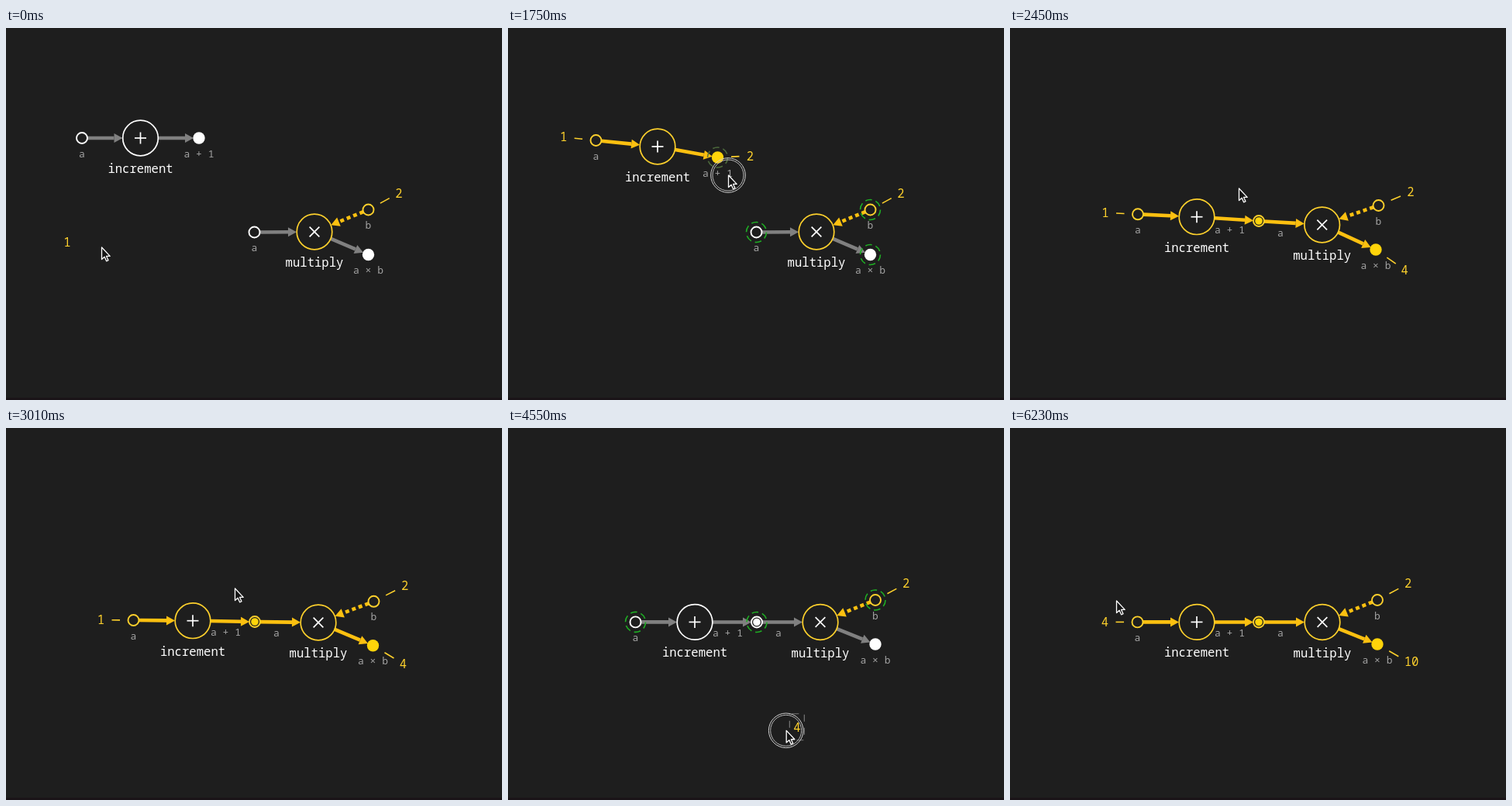
An HTML page for the animation above (6440 ms loop, 640 px wide and 480 px high).

```html
<!DOCTYPE html>
<html lang="en">
<head>
<meta charset="utf-8">
<title>Node graph</title>
<style>
  html, body { margin: 0; height: 100%; overflow: hidden; background: #1e1e1e; }
  svg { display: block; width: 640px; height: 480px; }
  text { font-family: "Noto Sans Mono", "DejaVu Sans Mono", monospace; white-space: pre; }
</style>
</head>
<body>
<svg id="stage" viewBox="0 0 640 480"></svg>
<script>
const LOOP = 6440, STEP = 70;
const BG = '#1e1e1e', GRAY = '#808080', WHITE = '#fff', LABEL = '#a3a3a3', GREEN = '#1fae24';
const GOLD = '#fdd02c', ARROW = '#fcc010', DISC = '#ffd40a';

// Moments at which the picture changes state
const GRAB_ONE = 280, DROP_ONE = 770, GRAB_PORT = 1470, DRAG_PORT = 1610, JOIN = 2030;
const HOVER_FOUR = 3640, GRAB_FOUR = 3850, DRAG_FOUR = 4060, CUT = 4410, DROP_FOUR = 5600;

const cursorTrack = [
  [70, 123, 283], [210, 79, 279], [350, 79, 279], [560, 70, 228], [700, 69, 180],
  [770, 74, 164], [910, 106, 138], [1050, 148, 121], [1120, 170, 113], [1260, 214, 126],
  [1470, 248, 156], [1540, 248, 156], [1750, 284, 190], [1960, 309, 232], [2030, 308, 235],
  [2240, 295, 207], [3010, 295, 207], [3360, 405, 252], [3640, 511, 301], [3990, 510.5, 306],
  [4130, 507, 345], [4270, 488, 397.5], [4340, 462, 395], [4800, 225, 384], [5040, 104, 366],
  [5180, 68.5, 316], [5320, 74, 282], [5460, 105, 247], [5600, 137, 223]
];

const times = [1540, 1750, 2030, 2240, 2450, 3010, 3990];
const track = (...points) => points.map(([x, y], i) => [times[times.length - points.length + i], x, y]);
const tracks = {
  inA: track([98, 142], [113.5, 145], [145, 190], [160, 228], [165, 240.3], [164.5, 248], [164.5, 250.4]),
  inc: track([173.5, 142], [193, 153], [230, 206], [238, 235], [241, 243.7], [241, 248.7], [241, 250.4]),
  out: track([249, 142], [270.5, 167], [314, 242], [321, 256], [321, 249], [321, 250], [321, 250.5]),
  mul: track([398, 263], [401, 258.5], [402.7, 254], [403, 251], [403, 250.5]),
  inB: track([467.5, 234.5], [473, 234], [475.5, 229], [474.5, 223.8], [474, 222]),
  prod: track([467.5, 292.5], [469, 291], [472, 286], [473.5, 280.7], [474, 279])
};

// Smooth curve through keys that never overshoots them
function sample(keys, t) {
  const last = keys.length - 1;
  if (t <= keys[0][0]) return keys[0].slice(1);
  if (t >= keys[last][0]) return keys[last].slice(1);
  const i = keys.findIndex(k => k[0] > t) - 1;
  const slope = (j, c) => (keys[j + 1][c] - keys[j][c]) / (keys[j + 1][0] - keys[j][0]);
  const tangent = (j, c) => {
    if (j === 0 || j === last) return 0;
    const p = slope(j - 1, c), q = slope(j, c);
    return p * q <= 0 ? 0 : 2 * p * q / (p + q);
  };
  const h = keys[i + 1][0] - keys[i][0], u = (t - keys[i][0]) / h;
  return [1, 2].map(c => {
    const a = keys[i][c], b = keys[i + 1][c];
    return a + (b - a) * u * u * (3 - 2 * u)
      + h * u * (1 - u) * ((1 - u) * tangent(i, c) - u * tangent(i + 1, c));
  });
}

const within = (t, from, to) => t >= from && t < to;
const add = (p, x, y) => [p[0] + x, p[1] + y];
const mix = (p, q, u) => [p[0] + (q[0] - p[0]) * u, p[1] + (q[1] - p[1]) * u];
const angle = (p, q) => Math.atan2(q[1] - p[1], q[0] - p[0]);
const polar = (p, a, r) => [p[0] + r * Math.cos(a), p[1] + r * Math.sin(a)];
const spring = s => s < 0 ? 0 : 1 - Math.exp(-s / 110) * Math.cos(s / 130);
const pop = s => 14 * Math.exp(-s / 35);
const f = n => n.toFixed(2);

const circle = (p, r, stroke, width, fill = 'none', extra = '') =>
  `<circle cx="${f(p[0])}" cy="${f(p[1])}" r="${r}" fill="${fill}" stroke="${stroke}" stroke-width="${width}" ${extra}/>`;
const line = (p, q, stroke, width, extra = '') =>
  `<line x1="${f(p[0])}" y1="${f(p[1])}" x2="${f(q[0])}" y2="${f(q[1])}" stroke="${stroke}" stroke-width="${width}" ${extra}/>`;
const text = (p, str, size, fill, anchor = 'middle') =>
  `<text x="${f(p[0])}" y="${f(p[1])}" font-size="${size}" fill="${fill}" text-anchor="${anchor}">${str}</text>`;

const caption = (p, str) => text(p, str, 13, LABEL);
const number = (p, str) => text(add(p, -4.7, 5.6), str, 15.6, GOLD, 'start');
const ring = (p, color = GREEN) => circle(p, 13, color, 1.6, 'none', 'stroke-dasharray="8.6 5.01"');
const openPort = (p, color) => circle(p, 7, color, 1.9, BG);
const fullPort = (p, on) => circle(p, 7.7, 'none', 0, on ? DISC : WHITE);

function arrow(from, to, r1, r2, on, dotted) {
  const a = angle(from, to), color = on ? ARROW : GRAY;
  const tip = polar(to, a, -r2), base = polar(tip, a, -11);
  const side = s => polar(base, a + s * Math.PI / 2, 6).map(f).join();
  return line(polar(from, a, r1), base, color, 4.6, dotted ? 'stroke-dasharray="5 4"' : '')
    + `<polygon points="${tip.map(f)} ${side(1)} ${side(-1)}" fill="${color}"/>`;
}

function node(p, name, on, turn) {
  const arms = [0, 1].map(k => {
    const a = turn + k * Math.PI / 2, r = turn ? 9 : 7.5;
    return line(polar(p, a, r), polar(p, a, -r), WHITE, 1.7);
  }).join('');
  return circle(p, 22.8, on ? GOLD : WHITE, 1.7, BG) + arms + text(add(p, 0, 45), name, 15.6, WHITE);
}

function tether(port, value) {
  const a = angle(port, value);
  const reach = Math.hypot(value[0] - port[0], value[1] - port[1]);
  const end = Math.min(reach - 14, 32);
  return end > 17.5 ? line(polar(port, a, 17.5), polar(port, a, end), GOLD, 1.6) : '';
}
const attached = (port, value, str) => tether(port, value) + number(value, str);

const grip = p =>
  `<rect x="${f(p[0] - 9.5)}" y="${f(p[1] - 18)}" width="19" height="34" fill="none" stroke="#777" stroke-width="1.2" stroke-dasharray="9 8" stroke-dashoffset="-3"/>`;

function pointer(p, pressed) {
  const halo = pressed ? circle(p, 22.3, '#d0d0d0', 1) + circle(p, 20, '#b5b5b5', 1) : '';
  return halo + `<path transform="translate(${f(p[0])} ${f(p[1])})" d="M0.5 0V15.6L4.1 12.3L6.6 17.8L9 16.7L6.6 11.4H11.2Z" fill="#151515" stroke="#fff" stroke-width="1.3" stroke-linejoin="round"/>`;
}

function draw(t) {
  const at = name => sample(tracks[name], t);
  const [inA, inc, out, mul, inB, prod] = ['inA', 'inc', 'out', 'mul', 'inB', 'prod'].map(at);
  const joined = t >= JOIN;
  const link = joined ? out : [320.5, 263.5];
  const incOn = within(t, DROP_ONE, CUT) || t >= DROP_FOUR;
  const mulOn = joined && incOn;
  const cursor = sample(cursorTrack, t);
  const held = (lag, x, y) => add(sample(cursorTrack, t - lag), x, y);
  const deg = Math.PI / 180;
  const color = on => on ? GOLD : WHITE;

  let s = `<rect width="640" height="480" fill="${BG}"/><rect y="477" width="640" height="3" fill="#1a1418"/>`;

  s += arrow(inA, inc, 7, 23, incOn) + arrow(inc, out, 23, 7, incOn);
  s += arrow(link, mul, 7, 23, mulOn) + arrow(mul, prod, 23, 7, mulOn) + arrow(inB, mul, 7, 23, true, true);
  s += node(inc, 'increment', incOn, 0) + node(mul, 'multiply', true, Math.PI / 4);

  s += openPort(inA, color(incOn)) + openPort(inB, GOLD) + fullPort(prod, mulOn);
  if (joined) s += openPort(link, color(incOn)) + circle(link, 4.8, 'none', 0, incOn ? DISC : WHITE);
  else s += openPort(link, WHITE) + fullPort(out, incOn);

  // Captions slide beside the shared port once the two nodes are joined
  const slide = Math.min(1, spring(t - JOIN));
  const outSpot = add(mix(out, inc, 37.5 / 80), 0, 18.7);
  const linkSpot = add(mix(link, mul, 28 / 82), 0, 18.7);
  s += caption(add(inA, 0, 24.5), 'a') + caption(add(inB, 0, 24.5), 'b') + caption(add(prod, 0, 24.5), 'a × b');
  s += caption(mix(add(out, 0, 24.5), outSpot, slide), 'a + 1');
  s += caption(mix(add(link, 0, 24.5), linkSpot, slide), 'a');

  if (within(t, GRAB_ONE, DROP_ONE)) s += [inA, out, link, inB, prod].map(p => ring(p)).join('');
  if (within(t, DRAG_PORT, JOIN)) s += [link, inB, prod].map(p => ring(p)).join('') + ring(out, '#4d6b3c');
  if (within(t, CUT, DROP_FOUR)) s += [inA, link, inB].map(p => ring(p)).join('');

  const swing = 2.2 * deg * spring(t - JOIN) * Math.exp(-Math.max(0, t - 2450) / 250);
  s += attached(inB, polar(inB, angle(mul, inB) - 6.3 * deg + swing, 45), '2');

  // Value fed into the first port
  const inSpot = polar(inA, angle(inc, inA), 42);
  if (t < DROP_ONE) {
    const one = t < GRAB_ONE ? [79, 276] : held(21, 0, -3);
    s += number(one, '1');
    if (t >= 210) s += grip(one);
  } else if (t < CUT) {
    s += attached(inA, mix([74, 161], inSpot, spring(t - DROP_ONE)), '1');
  } else if (t >= DROP_FOUR) {
    s += attached(inA, mix([140, 222], inSpot, spring(t - DROP_FOUR)), '4');
  }

  // Results
  if (incOn && !joined) {
    const lag = 13 * deg * Math.min(1, Math.max(0, (t - 1540) / 210));
    s += attached(out, polar(out, angle(inc, out) - lag, 42 + pop(t - DROP_ONE)), '2');
  }
  const resultAngle = angle(mul, prod) + 8 * deg + swing;
  if (within(t, JOIN, DROP_FOUR)) {
    const four = t < DRAG_FOUR ? polar(prod, resultAngle, 45.5) : held(21, 3, -4);
    s += t < CUT ? attached(prod, four, '4') : number(four, '4');
    if (t >= HOVER_FOUR) s += grip(four);
  } else if (t >= DROP_FOUR) {
    s += attached(prod, polar(prod, resultAngle, 45.5 + pop(t - DROP_FOUR)), '10');
  }

  const pressed = within(t, GRAB_ONE, DROP_ONE) || within(t, GRAB_PORT, JOIN) || within(t, GRAB_FOUR, DROP_FOUR);
  return s + pointer(cursor, pressed);
}

const stage = document.getElementById('stage');
const start = performance.now();
let shown = -1;
function tick() {
  const elapsed = Math.max(0, performance.now() - start) % LOOP;
  const t = Math.floor(elapsed / STEP) * STEP;
  if (t !== shown) stage.innerHTML = draw(shown = t);
  requestAnimationFrame(tick);
}
tick();
</script>
</body>
</html>
```
